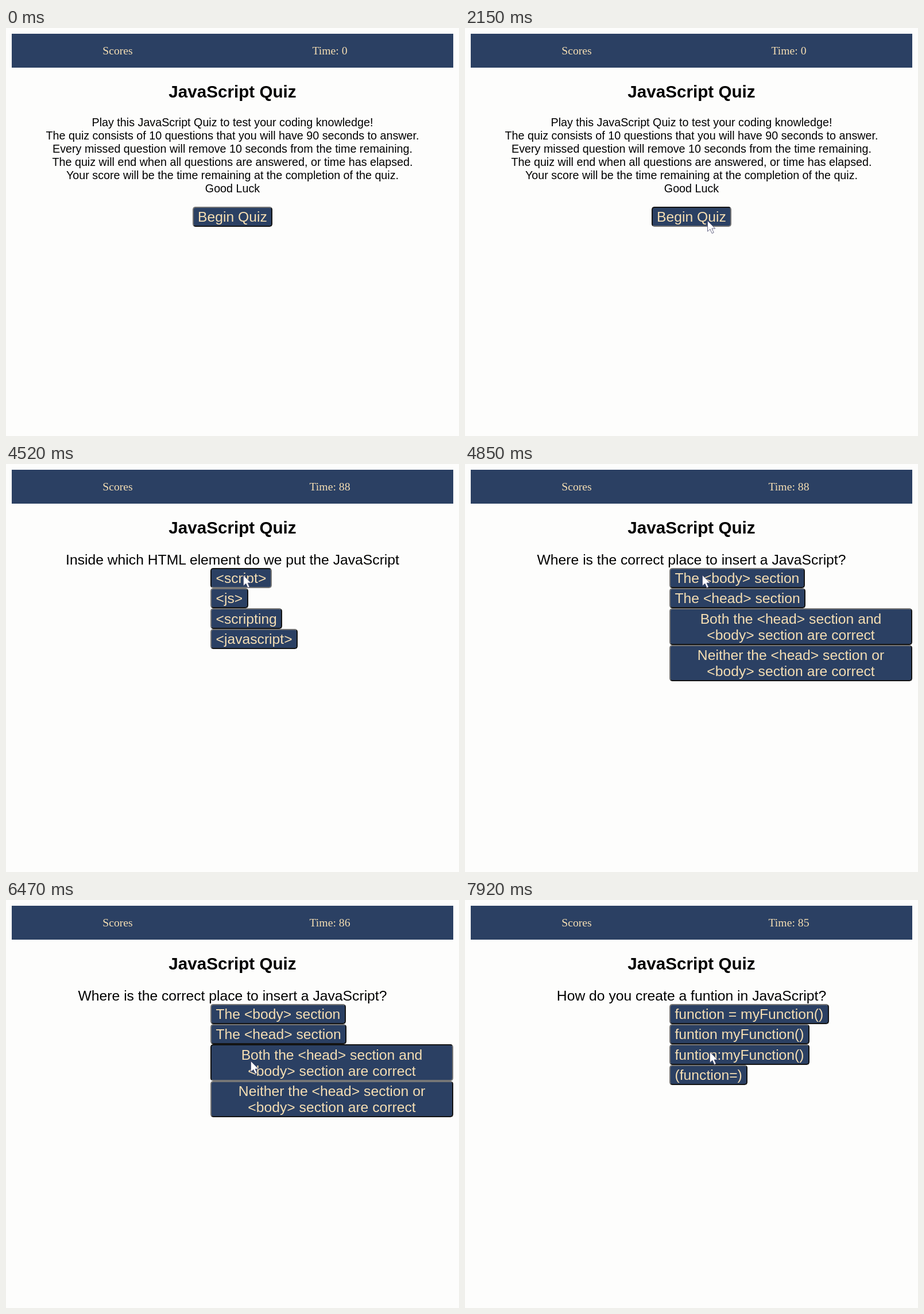
Recreate the animation shown at these times as an HTML page. Size 789x710 px, loop 7.99 s.

```html
<!DOCTYPE html>
<html lang="en">
<head>
<meta charset="utf-8">
<title>JavaScript Quiz</title>
<style>
  html, body { margin: 0; width: 100%; height: 100%; overflow: hidden; background: #fdfdfc; }
  body { position: relative; font: 19.73px/23px "Liberation Sans", Arial, sans-serif; color: #000; cursor: default; }
  header, header span, h1, section, .text, .choices, #cursor { position: absolute; }
  header { left: 10px; top: 10px; width: 769px; height: 59px; background: #2b4063;
    color: #f5deb3; font: 19.73px/22px "Liberation Serif", "Times New Roman", serif; }
  header span { top: 18px; width: 200px; text-align: center; }
  h1 { margin: 0; left: 0; top: 94px; width: 789px; font-size: 29.63px; line-height: 33px; text-align: center; }
  section { left: 0; top: 0; width: 789px; height: 710px; }
  .text { left: 0; top: 153px; width: 789px; text-align: center; white-space: pre-line; }
  .question { font-size: 24.7px; line-height: 27px; }
  .choices { left: 356px; top: 180.8px; width: 423px; }
  .intro .choices { left: 0; top: 310.7px; width: 789px; }
  .button { box-sizing: border-box; width: fit-content; padding: 2.2px 7.5px 1.1px; border: 2px solid;
    border-color: #767676 #141414 #141414 #767676; border-radius: 5px; background: #2b4063;
    color: #f5deb3; font-size: 24.7px; line-height: 28px; text-align: center; white-space: pre-line; }
  .intro .button { margin: 0 auto; }
  .wide { width: 100%; }
  .pressed { border-color: #141414 #767676 #767676 #141414; }
  #cursor { left: 0; top: 0; overflow: visible; }
</style>
</head>
<body>
<header>
  <span style="left:84.5px">Scores</span>
  <span style="left:454px" id="timer"></span>
</header>
<h1>JavaScript Quiz</h1>
<svg id="cursor" width="18" height="26">
  <path d="M.5 .5V19L4.9 15.1L8.2 22.4L11.2 21L8 14H13.8Z" fill="#fff" stroke="#46466a" stroke-width=".8"/>
</svg>
<script>
const LOOP = 7990;

const screens = [
  { from: 0, press: 2150, pick: 0, intro: true,
    text: `Play this JavaScript Quiz to test your coding knowledge!
The quiz consists of 10 questions that you will have 90 seconds to answer.
Every missed question will remove 10 seconds from the time remaining.
The quiz will end when all questions are answered, or time has elapsed.
Your score will be the time remaining at the completion of the quiz.
Good Luck`,
    choices: ['Begin Quiz'] },
  { from: 2480, press: 4520, pick: 0,
    text: 'Inside which HTML element do we put the JavaScript',
    choices: ['<script>', '<js>', '<scripting', '<javascript>'] },
  { from: 4850, press: 6470, pick: 2,
    text: 'Where is the correct place to insert a JavaScript?',
    choices: ['The <body> section', 'The <head> section',
      'Both the <head> section and\n<body> section are correct',
      'Neither the <head> section or\n<body> section are correct'] },
  { from: 6800, press: Infinity, pick: 0,
    text: 'How do you create a funtion in JavaScript?',
    choices: ['function = myFunction()', 'funtion myFunction()', 'funtion:myFunction()', '(function=)'] },
];

const ticks = [[0, 0], [3530, 89], [4460, 88], [5480, 87], [6470, 86], [7460, 85]];

// Pointer tip: time, x, y
const path = [
  [400, 453, 419], [700, 445, 380], [990, 432, 357], [1120, 432, 357], [1490, 422, 334],
  [2010, 422, 335], [2980, 422, 335], [3270, 413, 234], [3530, 413, 193], [5420, 413, 193],
  [5810, 425, 274], [6040, 426, 280], [7400, 426, 280], [7760, 426, 264], [LOOP, 426, 264],
];

const timer = document.getElementById('timer');
const cursor = document.getElementById('cursor');

function add(parent, tag, className, text = '') {
  const el = document.createElement(tag);
  el.className = className;
  el.textContent = text;
  parent.append(el);
  return el;
}

for (const s of screens) {
  s.el = add(document.body, 'section', s.intro ? 'intro' : '');
  add(s.el, 'div', s.intro ? 'text' : 'text question', s.text);
  const list = add(s.el, 'div', 'choices');
  s.buttons = s.choices.map(c => add(list, 'div', c.includes('\n') ? 'button wide' : 'button', c));
}
document.body.append(cursor);

function pointerAt(t) {
  const i = path.findIndex(p => p[0] > t);
  const [t0, x0, y0] = path[i - 1], [t1, x1, y1] = path[i];
  const k = (t - t0) / (t1 - t0);
  return [x0 + (x1 - x0) * k, y0 + (y1 - y0) * k].map(Math.round);
}

function draw(t) {
  const current = screens.findLast(s => s.from <= t);
  for (const s of screens) s.el.hidden = s !== current;
  current.buttons[current.pick].classList.toggle('pressed', t >= current.press);
  timer.textContent = 'Time: ' + ticks.findLast(([at]) => at <= t)[1];

  const visible = t >= path[0][0];
  cursor.style.visibility = visible ? 'visible' : 'hidden';
  if (visible) {
    const [x, y] = pointerAt(t);
    cursor.style.transform = `translate(${x}px, ${y}px)`;
  }
}

const start = performance.now();
function frame() {
  draw((performance.now() - start) % LOOP);
  requestAnimationFrame(frame);
}
frame();
</script>
</body>
</html>
```
